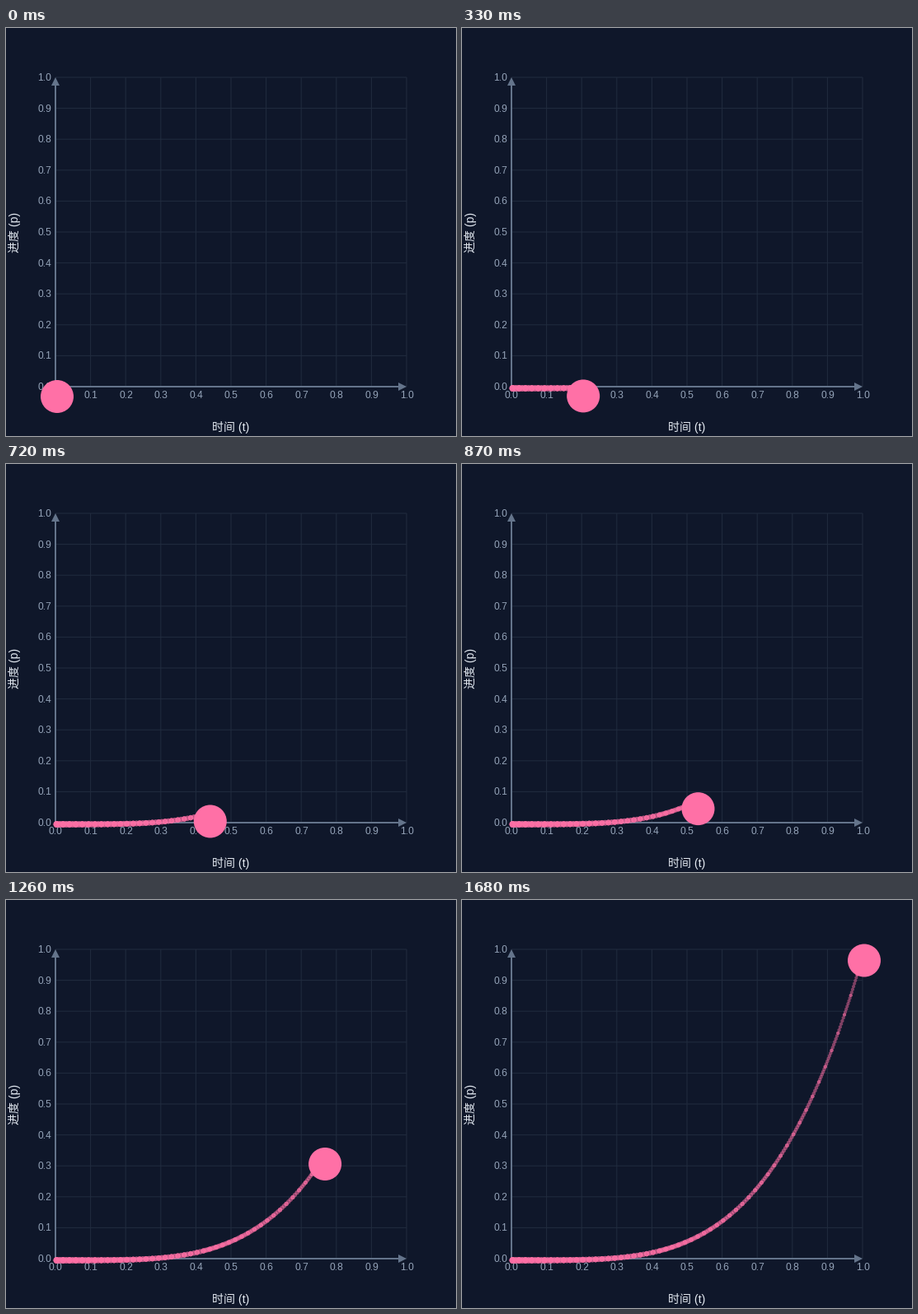
A matplotlib script for the animation above (1710 ms loop, 546 by 496 pixels).

```python
import math

import numpy as np
import matplotlib.pyplot as plt
from matplotlib.animation import FuncAnimation
from matplotlib.patches import Circle, Polygon

W, H = 546, 496
FRAMES, STEP_MS = 57, 30
X0, Y0, PLOT_W, PLOT_H = 60, 436, 426, 376
SPEED = 0.01817  # progress per frame

BG, GRID, AXIS = "#0f172a", "#212c3f", "#64748b"
TICK, LABEL, PINK = "#94a3b8", "#e2e8f0", (1.0, 0.44, 0.65)

plt.rcParams["font.family"] = ["Liberation Sans", "Noto Sans CJK JP"]

# At 72 dpi one point equals one pixel.
fig = plt.figure(figsize=(W / 72, H / 72), dpi=72, facecolor=BG)
ax = fig.add_axes([0, 0, 1, 1])
ax.set_xlim(0, W)
ax.set_ylim(H, 0)
ax.axis("off")


def progress(frame):
    return min(1.0, frame * SPEED)


def ball_pos(frame):
    t = progress(frame)
    return 62 + PLOT_W * t, 448 - 374.5 * t**4


def line(xs, ys, color, width, z):
    ax.plot(xs, ys, color=color, lw=width, solid_capstyle="butt",
            snap=False, zorder=z)


def label(x, y, text, size, color, ha="center", **kw):
    ax.text(x, y, text, fontsize=size, color=color, ha=ha, va="baseline",
            zorder=3, **kw)


def draw_chart():
    for i in range(11):
        gx, gy = X0 + PLOT_W * i / 10, Y0 - PLOT_H * i / 10
        line([gx, gx], [Y0 - PLOT_H, Y0], GRID, 1, 1)
        line([X0, X0 + PLOT_W], [gy, gy], GRID, 1, 1)
        label(gx + 0.3, 450.4, f"{i / 10:.1f}", 12, TICK)
        label(55.3, gy + 4, f"{i / 10:.1f}", 12, TICK, ha="right")

    top, right = Y0 - PLOT_H, X0 + PLOT_W
    line([X0, X0], [Y0 + 1, top + 8], AXIS, 2, 2)
    line([X0 - 1, right - 8], [Y0, Y0], AXIS, 2, 2)
    for tip in ([(X0, top), (X0 - 5, top + 10), (X0 + 5, top + 10)],
                [(right, Y0), (right - 10, Y0 - 5), (right - 10, Y0 + 5)]):
        ax.add_patch(Polygon(tip, fc=AXIS, ec="none", zorder=2))

    label(273, 490, "时间 (t)", 14, LABEL)
    label(14.7, 248, "进度 (p)", 14, LABEL, rotation=90,
          rotation_mode="anchor")


def trail_dots():
    """Dots along each step, about 4 px apart; step ends are drawn twice."""
    dots = [(61.5, 438, 0.0, 0)]
    for k in range(1, FRAMES):
        (xa, ya), (xb, yb) = ball_pos(k - 1), ball_pos(k)
        n = max(1, math.ceil(math.hypot(xb - xa, yb - ya) / 4))
        for u in np.linspace(0, 1, n + 1):
            t = progress(k - 1) + u * (progress(k) - progress(k - 1))
            dots.append((xa + u * (xb - xa) - 0.5,
                         ya + u * (yb - ya) - 10, t, k))
    return np.array(dots)


draw_chart()

dots = trail_dots()
t_dot, born = dots[:, 2], dots[:, 3]
sizes = (8 - 4 * t_dot) ** 2
colors = [(*PINK, 0.85 - 0.4 * t) for t in t_dot]
trail = ax.scatter(dots[:, 0], dots[:, 1], s=sizes, c=colors,
                   linewidths=0, zorder=4)
trail.set_snap(False)
ball = ax.add_patch(Circle(ball_pos(0), 20, fc=PINK, ec="none", zorder=5))


def update(frame):
    trail.set_sizes(np.where(born <= frame, sizes, 0))
    ball.center = ball_pos(frame)
    return trail, ball


anim = FuncAnimation(fig, update, frames=FRAMES, interval=STEP_MS,
                     repeat=True, repeat_delay=0)
plt.show()
```
